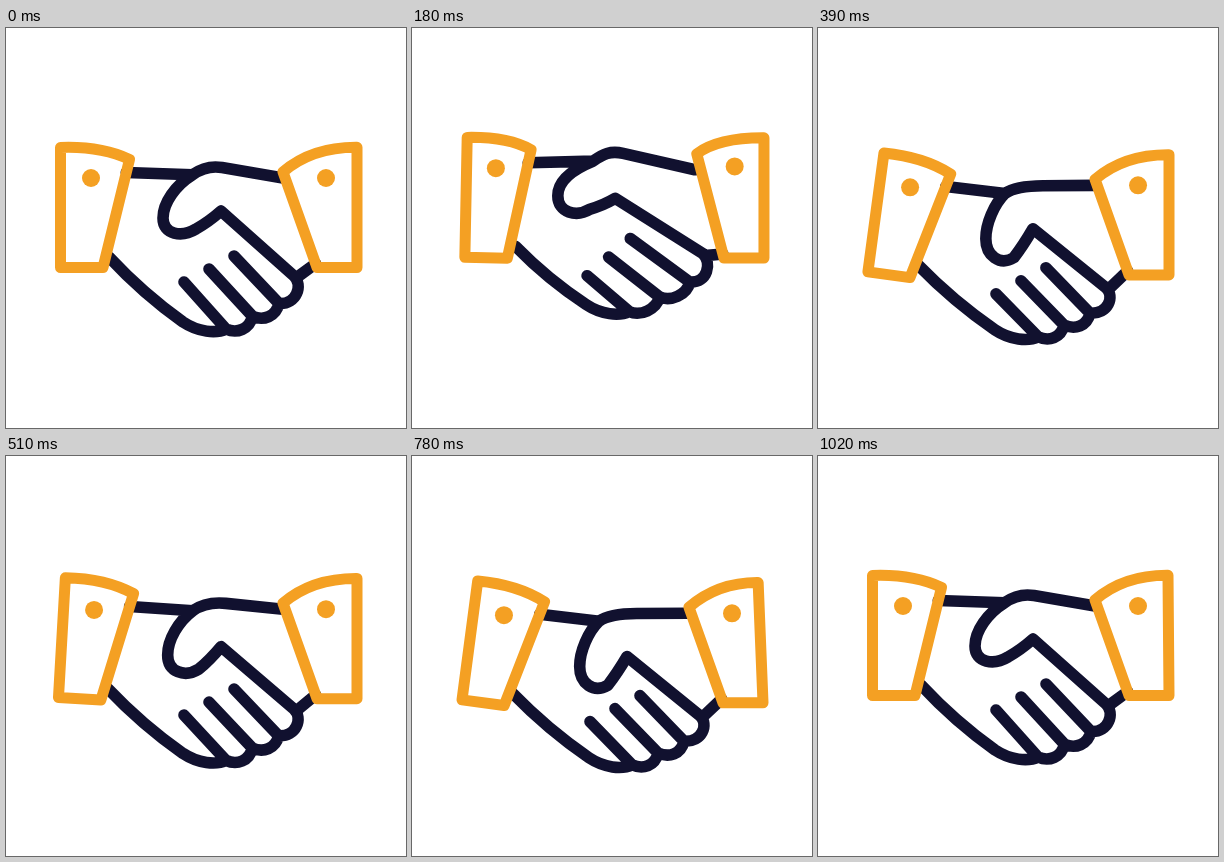
These frames come from a looping animation (400x400 px, 3050 ms). An HTML page with a canvas:

```html
<!DOCTYPE html>
<html lang="en">
<head>
<meta charset="utf-8">
<title>Handshake</title>
<style>
  html, body { margin: 0; width: 100%; height: 100%; overflow: hidden; background: #fff; }
  canvas { display: block; width: 400px; height: 400px; }
</style>
</head>
<body>
<canvas id="stage"></canvas>
<script>
const LOOP = 3050, STEP = 30, SIZE = 400, SWING = 200;
const NAVY = '#11112f', ORANGE = '#f4a023';

const canvas = document.getElementById('stage');
const ctx = canvas.getContext('2d');
const ratio = window.devicePixelRatio || 1;
canvas.width = canvas.height = SIZE * ratio;
ctx.scale(ratio, ratio);
ctx.lineCap = ctx.lineJoin = 'round';

// How far the hands are lifted, lowered, and the right cuff tilted (0 to 1).
let lift, dip, lean;

function pulse(t, peak) {
  const x = Math.max(0, 1 - Math.abs(t - peak) / SWING);
  return x * x * (3 - 2 * x);
}

function setPose(t) {
  const second = pulse(t, 4 * SWING);
  lift = pulse(t, SWING);
  dip = pulse(t, 2 * SWING) + second;
  lean = t < 4 * SWING ? second : Math.max(second, 0.2);
}

const add = ([x, y], dx, dy) => [x + dx, y + dy];
const mix = (a, b, k) => [a[0] + (b[0] - a[0]) * k, a[1] + (b[1] - a[1]) * k];
const sway = (up, down) => [up[0] * lift + down[0] * dip, up[1] * lift + down[1] * dip];
const joint = (x, y, up, down) => add([x, y], ...sway(up, down));

const move = p => ctx.moveTo(...p);
const line = p => ctx.lineTo(...p);
const bend = (c, p) => ctx.quadraticCurveTo(...c, ...p);
const curve = (c, d, p) => ctx.bezierCurveTo(...c, ...d, ...p);

// A cuff turns about its pivot; pinch pulls the upper corner of its opening.
function placer(pivot, turn, shift) {
  const cos = Math.cos(turn), sin = Math.sin(turn);
  return (x, y) => {
    const dx = x - pivot[0], dy = y - pivot[1];
    return add(pivot, dx * cos - dy * sin + shift[0], dx * sin + dy * cos + shift[1]);
  };
}

function leftCuff() {
  const at = placer([75, 180], 0.02 * lift + 0.135 * dip, sway([-0.5, -10], [3.2, 7.8]));
  const pinch = [-5 * lift, -lift];
  return {
    top: at(54.5, 119.5), arch: at(95, 118), low: at(54.5, 239.5),
    mouth: [add(at(123.5, 131.5), ...pinch), at(97, 239.5)],
    dot: add(at(85, 150), pinch[0] / 4, pinch[1] / 4)
  };
}

function rightCuff() {
  const at = placer([320, 180], 0, sway([1, -9.7], [0, 7.5]));
  const pinch = [7 * lift, -9 * lift];
  return {
    top: add(at(351, 119.3), -5 * lean, 0), arch: at(306, 119), low: at(351, 239.5),
    mouth: [add(at(277, 144), ...pinch), at(311, 239.5)],
    dot: add(at(320, 150), pinch[0] / 4, pinch[1] / 4)
  };
}

function drawCuff({ top, arch, mouth, low, dot }) {
  ctx.beginPath();
  move(top);
  bend(arch, mouth[0]);
  line(mouth[1]);
  line(low);
  ctx.closePath();
  ctx.stroke();
  ctx.beginPath();
  ctx.arc(...dot, 9, 0, Math.PI * 2);
  ctx.fill();
}

function drawHands(left, right) {
  const cuffEnd = joint(277, 150, [6, -8.5], [0, 7.5]);
  const back = joint(216, 139.5, [-5, -14.5], [9, 18.5]);
  const root = joint(186.5, 146.7, [-5.5, -14], [0.5, 19]);
  const thumb = joint(157, 190, [-11.5, -23], [11, 21]);
  const pad = joint(190, 201, [-12, -20.5], [6, 29]);
  const crook = joint(215, 183, [-12, -13], [0, 18]);
  const index = joint(288, 248, [3, -23], [0, 12]);
  const heel = joint(103, 229, [0.5, -11], [-3, 8]);

  // Fingers are spaced evenly between the first and the last one.
  const tips = [joint(273, 275.5, [5, -22], [-1, 10]), joint(220, 301, [-3, -18], [0, 8])];
  const gaps = [joint(228, 228, [-10, -18], [0, 12]), joint(178, 254, [-3, -6.5], [0, 12])];
  const palm = add(tips[1], -43, -7);

  ctx.beginPath();
  move(cuffEnd);
  line(back);
  curve(mix(cuffEnd, back, 1.18), add(root, 10, -7), root);
  curve([mix(root, thumb, 0.57)[0], mix(root, thumb, 0.24)[1]], add(thumb, 0, -15), thumb);
  curve(add(thumb, 0, 17), add(pad, -14, 8.5), pad);
  bend(add(mix(pad, crook, 0.5), 0, 2), crook);
  line(index);

  let from = tips[0];
  curve(add(index, 9, 9), add(from, 18, 1), from);
  for (const k of [0.5, 1]) {
    const tip = mix(...tips, k);
    curve(add(from, -3, 13), add(tip, 11, 5), tip);
    from = tip;
  }
  curve(add(from, -10, 5), add(palm, 15, 10), palm);
  bend(add(mix(palm, heel, 0.5), -3, 4), heel);

  for (const k of [0, 0.5, 1]) {
    move(mix(...gaps, k));
    line(mix(...tips, k));
  }
  move(mix(...left.mouth, 0.12));
  line(root);
  move(add(index, 2, 2));
  line(mix(...right.mouth, 0.96));
  ctx.stroke();
}

function draw(t) {
  setPose(t);
  const left = leftCuff(), right = rightCuff();
  ctx.clearRect(0, 0, SIZE, SIZE);
  ctx.lineWidth = 11.6;
  ctx.strokeStyle = NAVY;
  drawHands(left, right);
  ctx.lineWidth = 11;
  ctx.strokeStyle = ctx.fillStyle = ORANGE;
  drawCuff(left);
  drawCuff(right);
}

const start = performance.now();
function tick() {
  const t = (performance.now() - start) % LOOP;
  draw(Math.floor(t / STEP) * STEP);
  requestAnimationFrame(tick);
}
tick();
</script>
</body>
</html>
```
